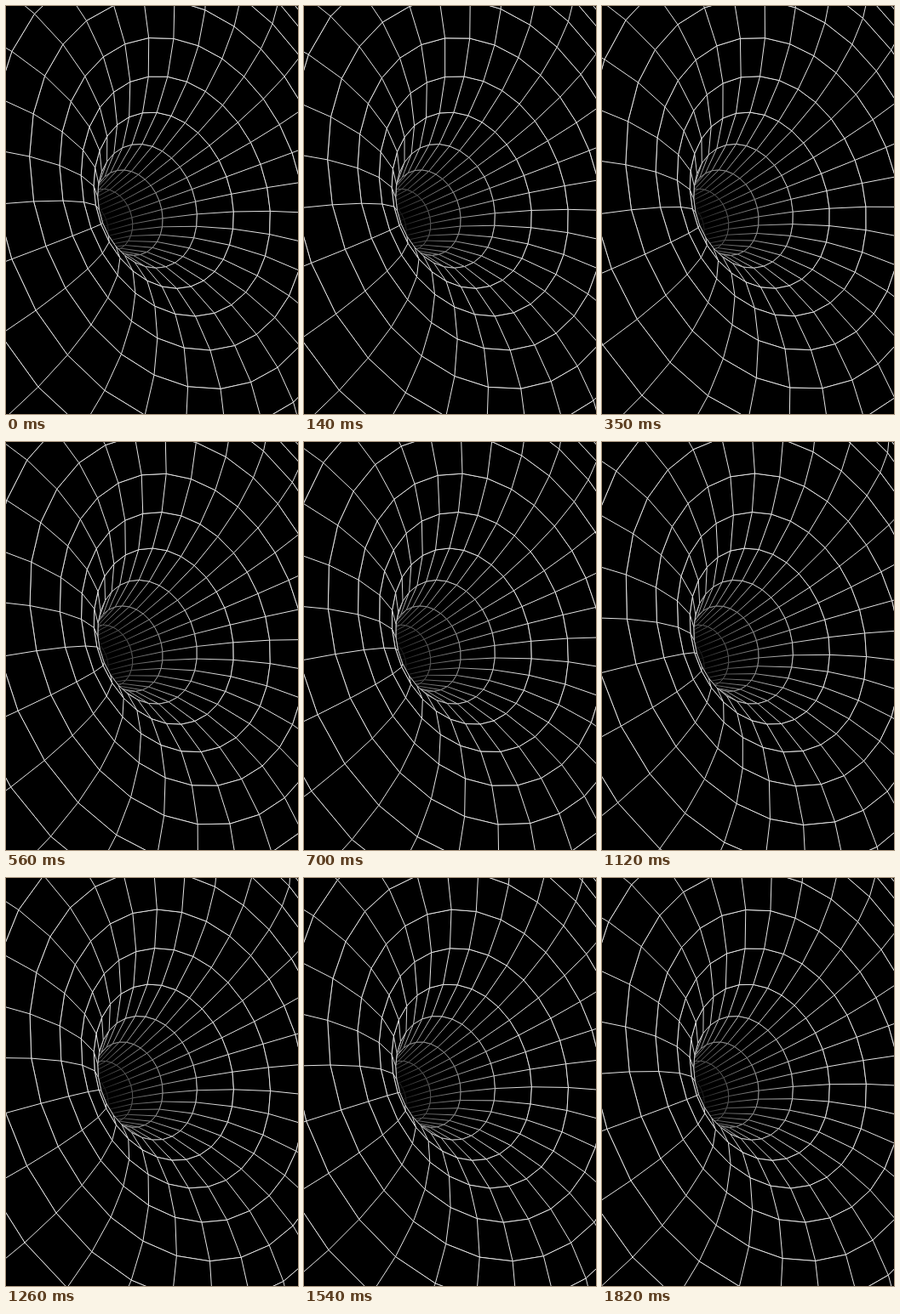
Write an HTML page with a canvas that moves like this. It is 343 px wide and 480 px high and loops after 1890 ms.

```html
<!DOCTYPE html>
<html lang="en">
<head>
<meta charset="utf-8">
<title>Wireframe tunnel</title>
<style>
html, body { margin: 0; width: 100%; height: 100%; overflow: hidden; background: #000; }
canvas { display: block; width: 343px; height: 480px; }
</style>
</head>
<body>
<canvas id="stage" width="343" height="480"></canvas>
<script>
const W = 343, H = 480;
const ctx = document.getElementById('stage').getContext('2d');
const LOOP = 1890, STEP = 70;
const SPOKES = 30, SEG = 2 * Math.PI / SPOKES;
const rad = deg => deg * Math.PI / 180;

// Inside of a torus, seen through its hole
const TUBE = 204, RADIUS = 236.8, PHASE = rad(10.4);
const FIRST = -1, LAST = 11;

// Camera: the torus axis leans by PITCH from the view and by ROLL on the screen
const FOCAL = 1490, DEPTH = 1521, OX = -78.6, OY = 20.5;
const PITCH = rad(41.4), ROLL = rad(18.8);
const sp = Math.sin(PITCH), cp = Math.cos(PITCH);
const sr = Math.sin(ROLL), cr = Math.cos(ROLL);

function project(k, angle) {
  const u = k * SEG;
  const r = RADIUS - TUBE * Math.cos(u);
  const h = TUBE * Math.sin(u);
  const a = r * Math.cos(angle), b = r * Math.sin(angle);
  const along = a * cp + h * sp;
  const scale = FOCAL / (DEPTH + a * sp - h * cp);
  return [
    W / 2 + (OX + along * cr + b * sr) * scale,
    H / 2 + (OY - along * sr + b * cr) * scale
  ];
}

// Lines fade to black down the throat
const tone = k => Math.max(0, Math.min(228, 30 + 55 * k));
const gray = v => `rgb(${v},${v},${v})`;

function polygon(points) {
  ctx.beginPath();
  points.forEach(p => ctx.lineTo(p[0], p[1]));
  ctx.closePath();
}

function strokeRing(points, k) {
  polygon(points);
  ctx.strokeStyle = gray(tone(k));
  ctx.stroke();
}

function strokeSpoke(p, q, k) {
  const g = ctx.createLinearGradient(p[0], p[1], q[0], q[1]);
  g.addColorStop(0, gray(tone(k)));
  g.addColorStop(1, gray(tone(k + 1)));
  ctx.strokeStyle = g;
  ctx.beginPath();
  ctx.moveTo(p[0], p[1]);
  ctx.lineTo(q[0], q[1]);
  ctx.stroke();
}

function draw(time) {
  const turn = PHASE - SEG * time / LOOP;
  const ring = k => Array.from({ length: SPOKES }, (_, i) => project(k, turn + i * SEG));

  ctx.fillStyle = '#000';
  ctx.fillRect(0, 0, W, H);
  ctx.lineWidth = 1;
  ctx.lineJoin = 'round';

  // Opaque strips, deepest first, so that the near wall hides the far one
  let inner = ring(FIRST);
  for (let k = FIRST; k < LAST; k++) {
    const outer = ring(k + 1);
    inner.forEach((p, i) => {
      const j = (i + 1) % SPOKES;
      polygon([p, inner[j], outer[j], outer[i]]);
      ctx.fill();
    });
    inner.forEach((p, i) => strokeSpoke(p, outer[i], k));
    strokeRing(inner, k);
    strokeRing(outer, k + 1);
    inner = outer;
  }
}

const start = performance.now();
function tick() {
  const t = Math.max(0, performance.now() - start) % LOOP;
  draw(Math.floor(t / STEP) * STEP);
  requestAnimationFrame(tick);
}
tick();
</script>
</body>
</html>
```
